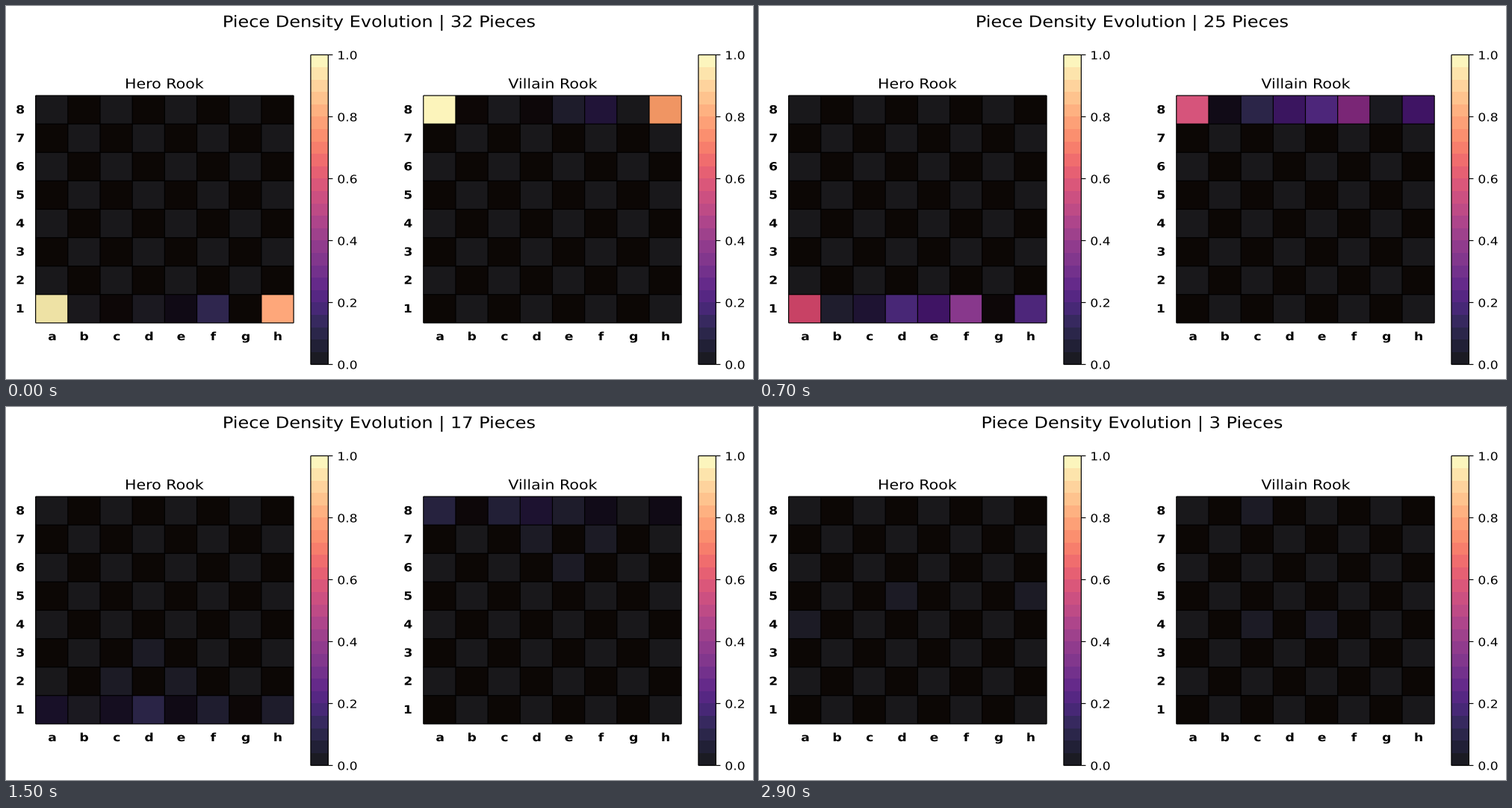
Animation, 1000 px wide and 500 px high, one loop 3000 ms. Source, as a matplotlib script:

```python
import matplotlib.pyplot as plt
import numpy as np
from matplotlib.animation import FuncAnimation
from matplotlib.colors import ListedColormap
from matplotlib.patches import PathPatch
from matplotlib.path import Path
from matplotlib.textpath import TextPath

FRAMES, INTERVAL = 30, 100
CANVAS_W, CANVAS_H = 810, 459  # drawing units, fitted to the 1000 x 500 stage
PT = 100 / 72
ALPHA = 0.9
LINE = dict(color="black", linewidth=0.86, snap=False)
FILES = "abcdefgh"
TOP, SIZE = 110.2, 279.8
BAR_TOP, BAR_BOTTOM, BAR_W = 60.1, 441.1, 19

# Peak density and the step at which it is reached on the back rank
BUMPS = {"b": (.05, 9), "c": (.13, 10), "d": (.22, 9.5),
         "e": (.20, 7.5), "f": (.36, 6.5), "g": (.02, 10)}
# Faint squares in order of appearance
HERO_TRAIL = "e2 c2 d3 b7 d7 c8 a4 d5 h5".split()
VILLAIN_TRAIL = "d7 f7 e6 e2 c2 a2 c8 e4 c4".split()


def square_index(square):
    return 8 - int(square[1]), FILES.index(square[0])


def density(step, rank, trail):
    grid = np.zeros((8, 8))
    row = grid[8 - rank]
    row[0] = 0.98 * np.exp(-(step / 9.5) ** 2)
    row[7] = 0.80 * np.exp(-step / 5)
    for name, (peak, center) in BUMPS.items():
        row[FILES.index(name)] = peak * np.exp(-((step - center) / 6) ** 2)
    for i, square in enumerate(trail):
        age = step - (9 + 2.2 * i)
        if 0 <= age < 8:
            grid[square_index(square)] = 0.028
    return grid


def text_path(x, y, text, size, centered=True, weight="normal"):
    path = TextPath((0, 0), text, size=size * PT,
                    prop={"family": "DejaVu Sans", "weight": weight})
    box = path.get_extents()
    shift = (box.x0 + box.x1) / 2 if centered else 0
    return Path(path.vertices * [1, -1] + [x - shift, y], path.codes)


def label(*args, **style):
    patch = PathPatch(text_path(*args, **style), facecolor="black", linewidth=0)
    return ax.add_patch(patch)


def draw_board(left, title):
    xs = np.linspace(left, left + SIZE, 9)
    ys = np.linspace(TOP, TOP + SIZE, 9)
    checker = np.indices((8, 8)).sum(axis=0) % 2
    ax.pcolormesh(xs, ys, checker, cmap=ListedColormap(["seashell", "#784610"]))
    mesh = ax.pcolormesh(xs, ys, np.zeros((8, 8)), cmap="magma",
                         vmin=0, vmax=1, alpha=ALPHA)
    ax.vlines(xs, ys[0], ys[-1], **LINE)
    ax.hlines(ys, xs[0], xs[-1], **LINE)
    half = SIZE / 16
    for i, name in enumerate(FILES):
        label(xs[i] + half + 0.4, 411.3, name, 10, weight="bold")
        label(left - 16.6, ys[i] + half + 4.6, str(8 - i), 10, weight="bold")
    label(left + SIZE / 2 + 0.4, 101.4, title, 12)
    return mesh


def draw_colorbar(left, bands=25):
    right = left + BAR_W
    levels = (np.arange(bands) + 0.5) / bands
    ax.pcolormesh([left, right], np.linspace(BAR_BOTTOM, BAR_TOP, bands + 1),
                  levels[:, None], cmap="magma", vmin=0, vmax=1, alpha=ALPHA)
    ax.vlines([left, right], BAR_TOP, BAR_BOTTOM, **LINE)
    ax.hlines([BAR_TOP, BAR_BOTTOM], left, right, **LINE)
    for value in np.linspace(0, 1, 6):
        y = BAR_BOTTOM + value * (BAR_TOP - BAR_BOTTOM)
        ax.hlines(y, right, right + 4.9, **LINE)
        label(right + 9.7, y + 5.5, f"{value:.1f}", 10, centered=False)


def heading_path(step):
    text = f"Piece Density Evolution | {32 - step} Pieces"
    return text_path(CANVAS_W / 2, 25.9, text, 14)


fig = plt.figure(figsize=(10, 5), dpi=100, facecolor="white")
ax = fig.add_axes([0, 0, 1, 1])
hero = draw_board(32.1, "Hero Rook")
villain = draw_board(452.6, "Villain Rook")
draw_colorbar(330.4)
draw_colorbar(750.8)
heading = ax.add_patch(PathPatch(heading_path(0), facecolor="black", linewidth=0))
ax.set_xlim(0, CANVAS_W)
ax.set_ylim(CANVAS_H, 0)
ax.axis("off")


def update(step):
    hero.set_array(density(step, 1, HERO_TRAIL))
    villain.set_array(density(step, 8, VILLAIN_TRAIL))
    heading.set_path(heading_path(step)) if hasattr(heading, "set_path") else None
    return hero, villain, heading


anim = FuncAnimation(fig, update, frames=FRAMES, interval=INTERVAL,
                     repeat=True, repeat_delay=0)
plt.show()
```
